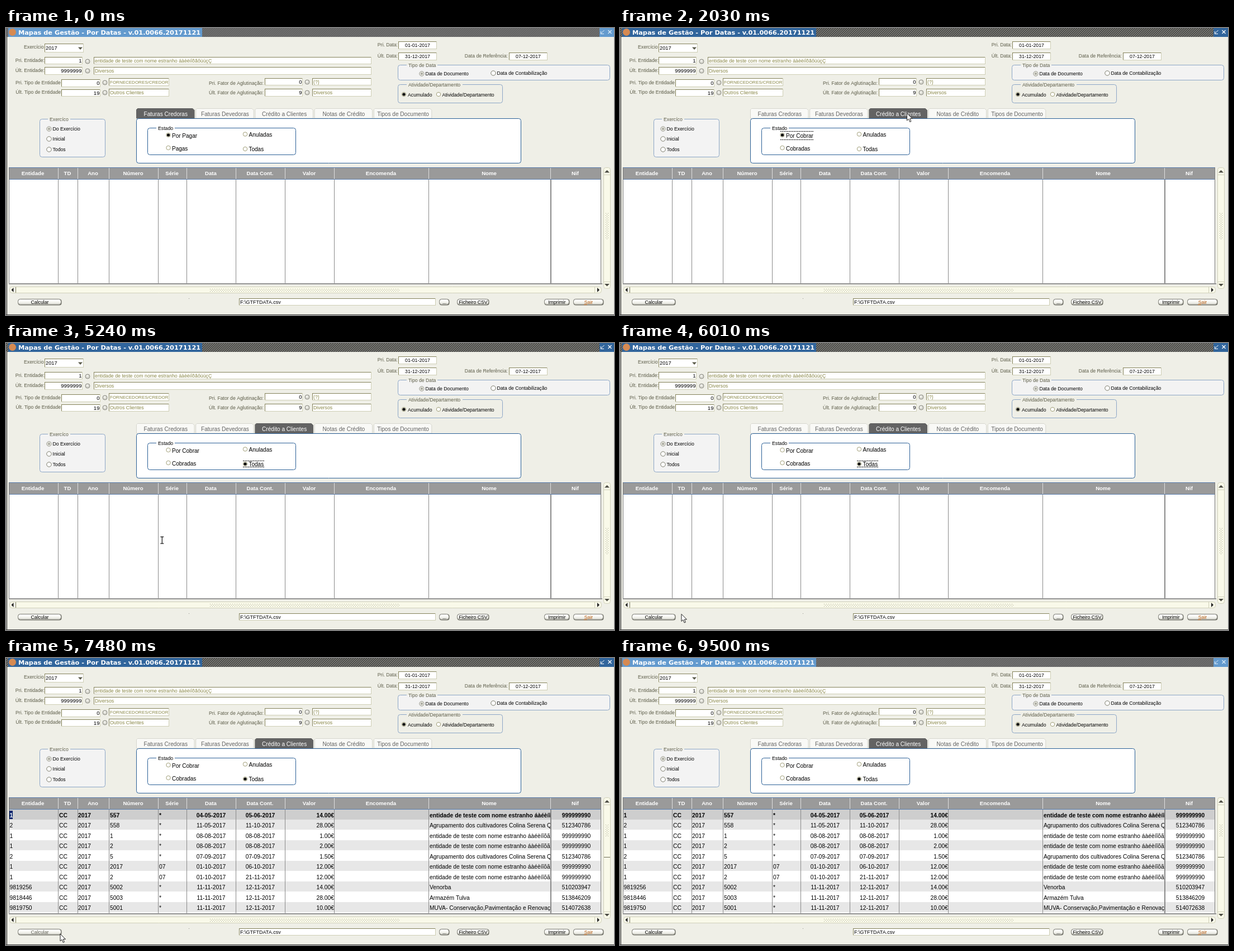
These frames come from a looping animation (1088 by 515 pixels, 9.58 s). An HTML page with a canvas:

```html
<!DOCTYPE html>
<html lang="pt">
<head>
<meta charset="utf-8">
<title>Mapas de Gestão</title>
<style>
html, body { margin: 0; width: 100%; height: 100%; overflow: hidden; background: #efefe7; }
canvas { display: block; }
</style>
</head>
<body>
<canvas id="stage" width="1088" height="515"></canvas>
<script>
const ctx = document.getElementById('stage').getContext('2d');
const LOOP = 9580;
const SANS = '"Liberation Sans", Arial, sans-serif';
const TITLE_FONT = '"DejaVu Sans", Verdana, sans-serif';
const INK = '#000', LABEL = '#5c5c48', OLIVE = '#8a8848', BLUE = '#2a5f96', PALE = '#8ca6c6';
const PAGE = '#efefe7', INSET = '#f3f3f3';

function text(str, x, y, { size = 8.7, color = INK, align = 'left', weight = '', font = SANS } = {}) {
  ctx.font = `${weight} ${size}px ${font}`;
  ctx.fillStyle = color;
  ctx.textAlign = align;
  ctx.fillText(str, x, y);
}

function rect(x, y, w, h, color) {
  ctx.fillStyle = color;
  ctx.fillRect(x, y, w, h);
}

function rounded(x, y, w, h, r, fill, stroke) {
  ctx.beginPath();
  ctx.roundRect(x + .5, y + .5, w - 1, h - 1, r);
  if (fill) { ctx.fillStyle = fill; ctx.fill(); }
  if (stroke) { ctx.strokeStyle = stroke; ctx.lineWidth = 1; ctx.stroke(); }
}

function disc(x, y, r, fill, stroke) {
  ctx.beginPath();
  ctx.arc(x, y, r, 0, Math.PI * 2);
  ctx.fillStyle = fill;
  ctx.fill();
  if (stroke) { ctx.strokeStyle = stroke; ctx.lineWidth = 1; ctx.stroke(); }
}

function polygon(points, fill, stroke) {
  ctx.beginPath();
  points.forEach(([x, y]) => ctx.lineTo(x, y));
  ctx.closePath();
  ctx.fillStyle = fill;
  ctx.fill();
  if (stroke) { ctx.strokeStyle = stroke; ctx.lineWidth = 1; ctx.stroke(); }
}

function line(x1, y1, x2, y2, color, width = 1, dash = []) {
  ctx.beginPath();
  ctx.moveTo(x1, y1);
  ctx.lineTo(x2, y2);
  ctx.setLineDash(dash);
  ctx.strokeStyle = color;
  ctx.lineWidth = width;
  ctx.stroke();
  ctx.setLineDash([]);
}

function clipped(x, y, w, h, draw) {
  ctx.save();
  ctx.beginPath();
  ctx.rect(x, y, w, h);
  ctx.clip();
  draw();
  ctx.restore();
}

function hatch(base, stripe) {
  const tile = document.createElement('canvas');
  tile.width = tile.height = 4;
  const g = tile.getContext('2d');
  g.fillStyle = base;
  g.fillRect(0, 0, 4, 4);
  g.fillStyle = stripe;
  for (let i = 0; i < 4; i++) g.fillRect(3 - i, i, 1, 1);
  return ctx.createPattern(tile, 'repeat');
}
const activeHatch = hatch('#4e4e4c', '#9c9c94');
const idleHatch = hatch('#666666', '#737373');

function titleBar(active) {
  const blue = active ? '#31659c' : '#639ace';
  rect(0, 0, 1088, 16, active ? activeHatch : idleHatch);
  rect(4, 0, 347, 16, blue);
  rect(1062, 0, 26, 16, blue);
  disc(11.5, 7.5, 6.5, '#d68a52');
  text('Mapas de Gestão - Por Datas - v.01.0066.20171121', 22, 12,
    { size: 11.3, color: '#fff', weight: 'bold', font: TITLE_FONT });
  const icon = active ? '#fff' : '#dcebf7';
  line(1077.5, 4, 1083.5, 10, icon, 1.2);
  line(1083.5, 4, 1077.5, 10, icon, 1.2);
  line(1070.5, 4, 1065, 9.5, icon);
  line(1064.5, 6, 1064.5, 10, icon);
  line(1064, 10.5, 1070, 10.5, icon);
}

function field(x, y, w, h, value, { size = 8.8, color = INK, align = 'left' } = {}) {
  rect(x, y, w, h, '#fff');
  rect(x, y, w, 1, '#84825a');
  rect(x, y, 1, h, '#84825a');
  rect(x, y + h - 1, w, 1, '#ceceb5');
  rect(x + w - 1, y, 1, h, '#ceceb5');
  const tx = { left: x + 2, right: x + w - 1.5, center: x + w / 2 }[align];
  const baseline = Math.round(y + h / 2 + size * .36);
  clipped(x, y, w - 1, h, () => text(value, tx, baseline, { size, color, align }));
}

function lookup(x, y) {
  disc(x, y, 4, '#d6d6ce', '#8c8c84');
  disc(x - .5, y - 1, 2, '#efefea');
}

function radio(x, y, label, { on = false, off = false, pressed = false, size = 8.7, dx = 6.5, dy = 3, r = 4.2 } = {}) {
  const rim = off || pressed ? '#9c9c94' : r < 4 ? '#a09e78' : '#7b7b6b';
  disc(x, y, r, pressed ? '#9c9a94' : off ? '#e7e7de' : '#fff', rim);
  if (on) disc(x, y, off ? 2 : 2.6, off ? '#a5a59c' : '#000');
  text(label, x + dx, y + dy, { size });
}

function group(x, y, w, h, label, lx, lw, { border = PALE, fill = PAGE, gap = PAGE, color = LABEL } = {}) {
  rounded(x, y, w, h, 4, fill, border);
  rect(lx - 3, y - 1, lw + 6, 2, gap);
  text(label, lx, y + 3.5, { color });
}

function button(x, w, label, color = INK) {
  rounded(x, 486, w, 12, 4, '#63635a');
  const shade = ctx.createLinearGradient(0, 486, 0, 497);
  shade.addColorStop(0, '#fff');
  shade.addColorStop(.55, '#f7f7f2');
  shade.addColorStop(1, '#c6c6bd');
  rounded(x, 486, w - 1, 11, 4, shade, '#7b7b73');
  text(label, x + w / 2, 495, { color, align: 'center' });
}

function form() {
  rect(0, 16, 1088, 499, PAGE);
  rect(1, 16, 1, 499, '#101010');
  rect(0, 514, 1088, 1, '#424242');

  text('Exercício', 32, 37, { color: LABEL });
  field(69, 28, 70, 16, '2017', { size: 9.3 });
  polygon([[129, 34.5], [137, 34.5], [133, 39]], '#5a5a4a');

  const right = { color: LABEL, align: 'right' };
  text('Pri. Entidade:', 69, 61, right);
  text('Últ. Entidade:', 69, 79, right);
  text('Pri. Tipo de Entidade', 17, 101, { color: LABEL });
  text('Últ. Tipo de Entidade:', 100.5, 118, right);
  text('Pri. Fator de Aglutinação:', 461, 102, right);
  text('Últ. Fator de Aglutinação:', 461, 119, right);
  text('Pri. Data:', 701, 33, right);
  text('Últ. Data:', 701, 53, right);
  text('Data de Referência:', 898, 53, right);

  const number = { align: 'right', size: 9.6 }, note = { color: OLIVE };
  field(69, 52, 68, 13, '1', number);
  field(69, 70, 68, 14, '9999999', number);
  field(157, 52, 497, 13, 'entidade de teste com nome estranho áàèèiîõãôúùçÇ', note);
  field(157, 70, 497, 14, 'Diversos', note);
  field(99, 92, 70, 14, '0', number);
  field(99, 110, 70, 13, '19', number);
  field(184, 90, 108, 14, 'FORNECEDORES/CREDORES', { color: OLIVE, size: 8 });
  field(184, 109, 108, 14, 'Outros Clientes', note);
  field(463, 90, 68, 13, '0', number);
  field(463, 109, 68, 14, '9', number);
  field(548, 90, 106, 13, '(?)', note);
  field(548, 109, 106, 14, 'Diversos', note);
  [[146, 60], [146, 77], [177, 98], [177, 116], [539, 97], [539, 116]].forEach(p => lookup(...p));

  field(702, 24, 69, 14, '01-01-2017', { align: 'center' });
  field(702, 44, 69, 14, '31-12-2017', { align: 'center' });
  field(900, 44, 69, 14, '07-12-2017', { align: 'center' });

  group(701, 66, 380, 28, 'Tipo de Data', 720, 49, { fill: INSET });
  radio(744, 82, 'Data de Documento', { on: true, off: true });
  radio(872, 81, 'Data de Contabilização');
  group(701, 101, 188, 34, 'Atividade/Departamento', 720, 94);
  radio(712, 119, 'Acumulado', { on: true, dx: 7, dy: 4, r: 3.7 });
  radio(774, 119, 'Atividade/Departamento', { dy: 4, r: 3.7 });
  group(60, 163, 118, 69, 'Exercíco', 78, 34, { fill: INSET });
  radio(77, 181, 'Do Exercício', { on: true, off: true, dy: 2.5 });
  radio(77, 199, 'Inicial', { dy: 2.5 });
  radio(77, 218, 'Todos', { dy: 2.5 });
}

const tabNames = ['Faturas Credoras', 'Faturas Devedoras', 'Crédito a Clientes', 'Notas de Crédito', 'Tipos de Documento'];

function tabs(current) {
  tabNames.forEach((name, i) => {
    const x = 233.5 + i * 106.2, w = 103.5, on = i === current;
    polygon([[x, 162], [x, 146.5], [x + 2, 144.5], [x + w - 3, 144.5], [x + w, 147.5], [x + w, 162]],
      on ? '#636363' : '#f9f9f6', on ? '#636363' : '#d6d6ce');
    text(name, x + w / 2 + .5, 158, { size: 10.1, color: on ? '#fff' : '#636363', align: 'center' });
  });
  rounded(233, 162, 689, 81, 4, '#fff', BLUE);
}

function stateOptions(t, credit) {
  const chosen = t >= 4135, pressed = t >= 4060 && !chosen;
  group(253, 179, 266, 49, 'Estado', 272, 27, { border: BLUE, fill: '#fff', gap: '#fff', color: INK });
  const option = { size: 10, dy: 5, r: 3.7 };
  radio(290.5, 192, credit ? 'Por Cobrar' : 'Por Pagar', { ...option, on: !chosen });
  radio(290.5, 215, credit ? 'Cobradas' : 'Pagas', option);
  radio(428, 190.5, 'Anuladas', { ...option, dy: 4.5 });
  radio(428, 217, 'Todas', { ...option, dy: 4, on: chosen, pressed });
  if (credit && !chosen) {
    line(287, 185.5, 346, 185.5, '#000', 1, [2, 1]);
    line(287, 200.5, 346, 200.5, '#000', 1, [2, 1]);
  }
  if (t >= 4060 && t < 6940) {
    line(424, 211.5, 463, 211.5, '#000', 1, [2, 1]);
    line(424, 222.5, 463, 222.5, '#000', 1, [2, 1]);
  }
}

const edges = [5, 93, 128, 184, 272, 323, 411, 499, 587, 756, 974, 1064];
const heads = ['Entidade', 'TD', 'Ano', 'Número', 'Série', 'Data', 'Data Cont.', 'Valor', 'Encomenda', 'Nome', 'Nif'];
const tester = ['entidade de teste com nome estranho áàéèíîõãôúùçÇ', '999999990'];
const growers = ['Agrupamento dos cultivadores Colina Serena Q', '512340786'];
const rows = [
  ['1', '557', '*', '04-05-2017', '05-06-2017', '14.00€', ...tester],
  ['2', '558', '*', '11-05-2017', '11-10-2017', '28.00€', ...growers],
  ['1', '1', '*', '08-08-2017', '08-08-2017', '1.00€', ...tester],
  ['1', '2', '*', '08-08-2017', '08-08-2017', '2.00€', ...tester],
  ['2', '5', '*', '07-09-2017', '07-09-2017', '1.50€', ...growers],
  ['1', '2017', '07', '01-10-2017', '06-10-2017', '12.00€', ...tester],
  ['1', '2', '07', '01-10-2017', '21-11-2017', '12.00€', ...tester],
  ['9819256', '5002', '*', '11-11-2017', '12-11-2017', '14.00€', 'Venorba', '510203947'],
  ['9818446', '5003', '*', '11-11-2017', '12-11-2017', '28.00€', 'Armazém Tulva', '513846209'],
  ['9819750', '5001', '*', '11-11-2017', '12-11-2017', '10.00€', 'MUVA- Conservação,Pavimentação e Renovação', '514072638'],
];

function tableRow(row, i, cellSelected) {
  const [entity, num, series, date, posted, value, name, nif] = row;
  const top = Math.round(272 + i * 18.45), y = top + 14;
  const style = { size: 10.3, weight: i ? '' : 'bold' };
  const center = { ...style, align: 'center' };
  if (i % 2 || !i) rect(6, top, 1058, 18, i ? '#e7e7e7' : '#cecece');
  if (cellSelected) rect(6, 274, 6, 15, '#08246b');
  text(entity, 6.5, y, { ...style, color: cellSelected ? '#fff' : INK });
  text('CC', 95, y, style);
  text('2017', 129, y, style);
  text(num, 186, y, style);
  text(series, 274, y, style);
  text(date, 367, y, center);
  text(posted, 455, y, center);
  text(value, 587, y, { ...style, align: 'right' });
  clipped(757, top, 218, 19, () => text(name, 758, y, style));
  text(nif, 1020.5, y, center);
}

function table(filled, cellSelected) {
  rect(5, 250, 1060, 210, '#fff');
  if (filled) rows.forEach((row, i) => tableRow(row, i, cellSelected && !i));
  rect(5, 250, 1060, 22, '#9a9a9a');
  rect(5, 250, 1060, 1, '#5a7eae');
  rect(5, 271, 1060, 1, '#5a7eae');
  heads.forEach((head, i) => {
    text(head, (edges[i] + edges[i + 1]) / 2 - (i ? .5 : 1), 264,
      { size: 9.6, color: '#fff', weight: 'bold', align: 'center' });
    if (!i) return;
    rect(edges[i], 251, 1, 20, '#dedede');
    rect(edges[i], 272, 1, 186, '#8a8a8a');
  });
  rect(974, 272, 2, 186, '#8a8a8a');
  rect(5, 250, 1, 209, '#7a7a7a');
  rect(1064, 250, 1, 209, '#7a7a7a');
  rect(5, 458, 1062, 2, '#949494');
}

function grip(x, y, w, h) {
  ctx.fillStyle = '#a5a58c';
  for (let j = 0; j < h; j += 2)
    for (let i = (j % 4) ? 2 : 0; i < w; i += 4) ctx.fillRect(x + i, y + j, 1, 1);
}

function scrollBars(filled) {
  const cream = '#f9f9e9', rim = '#d0d0ba';
  rounded(1069, 250, 13, 218, 4, cream, rim);
  rect(1070, 263, 11, 1, rim);
  rect(1070, 455, 11, 1, rim);
  polygon([[1071, 259.5], [1080, 259.5], [1075.5, 255]], '#4a4a42');
  polygon([[1071, 459], [1080, 459], [1075.5, 463.5]], '#4a4a42');
  if (filled) {
    rect(1070, 357, 11, 1, '#6b6b52');
    grip(1073, 299, 6, 22);
  } else {
    grip(1073, 332, 6, 47);
  }
  rounded(6, 464, 1060, 12, 4, cream, rim);
  rect(17, 465, 1, 10, '#7b7b63');
  rect(1053, 465, 1, 10, rim);
  polygon([[13.5, 466], [13.5, 474], [9.5, 470]], '#202020');
  polygon([[1058, 466], [1058, 474], [1062, 470]], '#202020');
  grip(365, 468, 340, 5);
}

function footer(hover) {
  button(21, 79, 'Calcular', hover ? '#63635a' : INK);
  field(417, 485, 352, 13, 'F:\\GTFTDATA.csv', { size: 9 });
  button(775, 19, '...');
  button(807, 58, 'Ficheiro CSV');
  button(963, 46, 'Imprimir');
  button(1015, 55, 'Sair', '#b55a10');
  line(1034, 496.5, 1040, 496.5, '#b55a10');
  rect(327, 485, 1, 1, '#8c8c84');
}

// Pointer moves: start, end, number of steps, waypoints.
const moves = [
  [360, 1250, 12, [[958, 461], [715, 260], [465, 110], [513, 145]]],
  [1330, 1400, 2, [[513, 145], [513, 152.5]]],
  [2870, 3510, 9, [[513, 152.5], [470, 190], [450.5, 219]]],
  [4600, 5540, 13, [[450.5, 219], [480, 236], [290, 347], [195, 415]]],
  [5610, 6160, 8, [[195, 415], [130, 470], [97, 495]]],
  [6320, 6320, 1, [[97, 495], [96.5, 494.5]]],
  [7940, 8580, 9, [[96.5, 494.5], [330, 478], [640, 470], [765, 501], [800, 530]]],
];

function spline(points, u) {
  const last = points.length - 1;
  const i = Math.min(last - 1, Math.floor(u * last)), f = u * last - i;
  const at = k => points[Math.max(0, Math.min(last, k))];
  return [0, 1].map(d => {
    const [a, b, c, e] = [at(i - 1)[d], at(i)[d], at(i + 1)[d], at(i + 2)[d]];
    return b + f * ((c - a) + f * ((2 * a - 5 * b + 4 * c - e) + f * (3 * b - a - 3 * c + e))) / 2;
  });
}

function pointerAt(t) {
  const move = moves.filter(m => t >= m[0]).pop();
  if (!move) return null;
  const [start, end, steps, path] = move;
  const progress = end > start ? Math.min(1, (t - start) / (end - start)) : 1;
  return spline(path, (Math.floor(progress * (steps - 1)) + 1) / steps);
}

function arrow(x, y) {
  const outline = [[0, 0], [0, 13], [3, 10.3], [5.2, 15.5], [7.4, 14.6], [5.3, 9.6], [9.5, 9.6]];
  polygon(outline.map(([a, b]) => [x + a + .5, y + b + .5]), '#fff', '#202020');
}

function beam(x, y) {
  line(x, y - 6, x, y + 6, '#101010', 1.2);
  [-6, 6].forEach(d => line(x - 3, y + d, x + 3, y + d, '#101010', 1.2));
}

function busy(x, y, turn) {
  ctx.lineWidth = 3.6;
  ctx.strokeStyle = '#1681c9';
  ctx.beginPath();
  ctx.arc(x, y, 6.2, 0, Math.PI * 2);
  ctx.stroke();
  ctx.strokeStyle = '#6cc4f2';
  ctx.beginPath();
  ctx.arc(x, y, 6.2, turn, turn + 1.8);
  ctx.stroke();
}

function pointer(t, position) {
  if (!position) return;
  const [x, y] = position;
  if (t >= 6940 && t < 7480) return busy(95.5, 494, t < 7020 ? -1.2 : .2);
  const overTable = x > 5 && x < 1064 && y > 272 && y < 458;
  const overFile = x > 417 && x < 769 && y > 485 && y < 498;
  (overTable || overFile ? beam : arrow)(x, y);
}

function draw(t) {
  const credit = t >= 2030, filled = t >= 7480;
  const position = pointerAt(t);
  const hover = !!position && position[0] < 100 && position[1] > 485 && position[1] < 499;
  form();
  titleBar(t >= 2030 && t < 9500);
  tabs(credit ? 2 : 0);
  stateOptions(t, credit);
  table(filled, filled && t < 9500);
  scrollBars(filled);
  footer(hover);
  pointer(t, position);
}

const began = performance.now();
function tick() {
  draw((performance.now() - began) % LOOP);
  requestAnimationFrame(tick);
}
tick();
</script>
</body>
</html>
```
